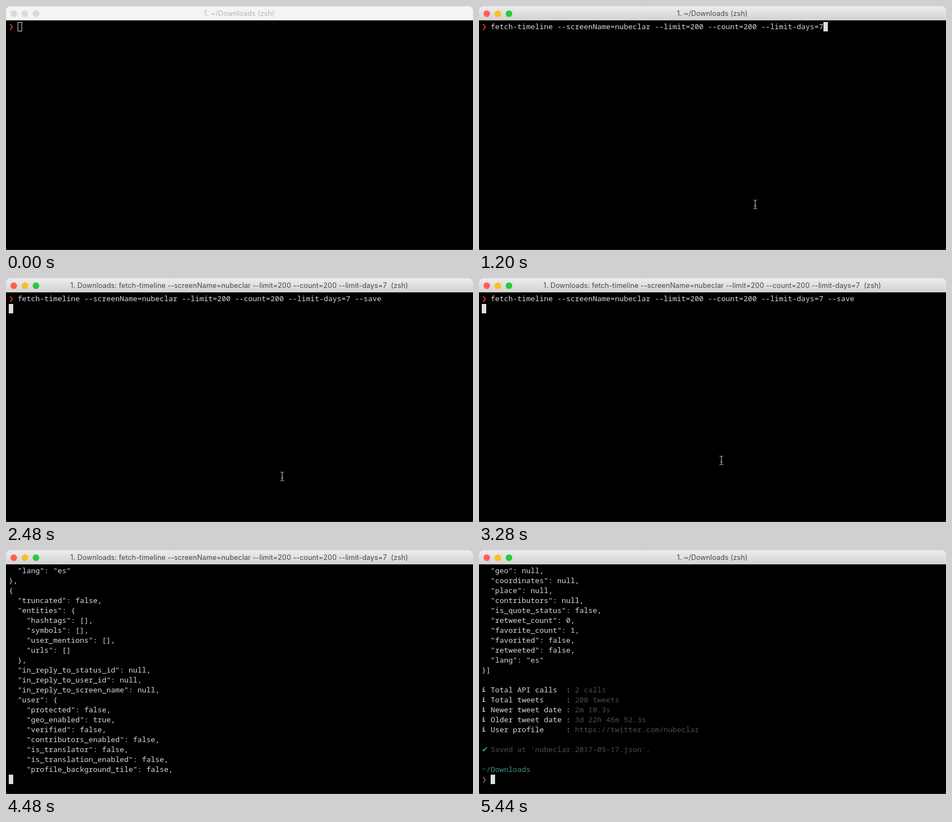
Write an HTML page that moves like this. It is 842 px wide and 442 px high and loops after 8000 ms.

```html
<!DOCTYPE html>
<html lang="en">
<head>
<meta charset="utf-8">
<title>Terminal</title>
<style>
html, body { margin: 0; width: 100%; height: 100%; overflow: hidden; background: #000; }
#stage {
  position: relative; width: 842px; height: 442px; overflow: hidden;
  background: linear-gradient(#dcdcd8 50%, #3a3a36 50%);
}
#window { position: absolute; inset: 1px 0 0; border-radius: 5px; overflow: hidden; background: #000; }
#bar { height: 25px; background: linear-gradient(#ededed, #d2d2d2); }
#title {
  position: absolute; top: 5px; left: 0; width: 841px; text-align: center; white-space: pre;
  font: 12.6px/18px Inter, sans-serif; letter-spacing: .12px; color: #48484a;
}
#bar i { position: absolute; top: 7px; width: 12px; height: 12px; border-radius: 50%; }
#bar i:nth-of-type(1) { left: 8px; background: #fb605a; }
#bar i:nth-of-type(2) { left: 28px; background: #fdba2c; }
#bar i:nth-of-type(3) { left: 48px; background: #2cc83e; }
.idle #bar { background: #f4f4f2; }
.idle #title { color: #b4b4b4; }
.idle #bar i { background: #d9d9d7; }
#cursor { position: absolute; width: 8px; height: 17px; box-sizing: border-box; background: #dededc; }
.idle #cursor { background: none; border: 1px solid #dededc; }
.hint #cursor { background: #fff; }
pre {
  position: absolute; left: 5px; top: 28px; margin: 0; color: #d6dad6;
  font: 13.3333px/18px "Noto Sans Mono", monospace; font-variant-ligatures: none;
}
pre b {
  display: inline-block; width: 8px; height: 18px; vertical-align: top;
  font: bold 10.5px/19px "DejaVu Sans", sans-serif; color: #dc3a22;
}
pre .info { font: bold 11px/19px "DejaVu Sans Mono", monospace; color: inherit; }
pre .done { color: #35ac42; font-size: 14px; }
pre .past { color: #755c74; }
pre s { text-decoration: none; color: #4a4c4a; }
pre u { text-decoration: none; color: #43908c; }
#edge { position: absolute; top: 441px; width: 100%; height: 1px; background: #262624; }
#mouse { position: absolute; left: 0; top: 0; overflow: visible; fill: none; stroke: #bcbcb8; stroke-width: 1.2; }
</style>
</head>
<body>
<div id="stage">
  <div id="window"><div id="bar"><i></i><i></i><i></i></div></div>
  <div id="title"></div>
  <div id="cursor"></div>
  <pre id="text"></pre>
  <div id="edge"></div>
  <svg id="mouse" width="1" height="1"><path d="M-3.5-7.5Q-1-7.5 0-6Q1-7.5 3.5-7.5M0-6V7M-3.5 8.5Q-1 8.5 0 7Q1 8.5 3.5 8.5M-2 3H2"/></svg>
</div>
<script>
const $ = id => document.getElementById(id);
const LOOP = 8000, STEP = 80, ROWS = 22;
const user = 'nubeclar';
const command = `fetch-timeline --screenName=${user} --limit=200 --count=200 --limit-days=7`;
const flag = ' --save';
const prompt = '<b>❯</b> ';

const tweet = `{
  "truncated": false,
  "entities": {
    "hashtags": [],
    "symbols": [],
    "user_mentions": [],
    "urls": []
  },
  "in_reply_to_status_id": null,
  "in_reply_to_user_id": null,
  "in_reply_to_screen_name": null,
  "user": {
    "protected": false,
    "geo_enabled": true,
    "verified": false,
    "contributors_enabled": false,
    "is_translator": false,
    "is_translation_enabled": false,
    "profile_background_tile": false,
    "profile_link_color": "000000",
    "profile_text_color": "000000",
    "profile_use_background_image": false,
    "has_extended_profile": true,
    "default_profile": false,
    "default_profile_image": false,
    "following": false,
    "follow_request_sent": false,
    "notifications": false,
    "translator_type": "none"
  },
  "geo": null,
  "coordinates": null,
  "place": null,
  "contributors": null,
  "is_quote_status": false,
  "retweet_count": 0,
  "favorite_count": 1,
  "favorited": false,
  "retweeted": false,
  "lang": "es"
}`.split('\n');
const json = [...tweet.slice(0, -1), '},', ...tweet.slice(0, -1), '}]'];

const stat = (label, value) => `<b class="info">i</b> ${label.padEnd(17)}: <s>${value}</s>`;
const stats = ['',
  stat('Total API calls', '2 calls'),
  stat('Total tweets', '200 tweets'),
  stat('Newer tweet date', '2m 10.3s'),
  stat('Older tweet date', '3d 22h 46m 52.3s'),
  stat('User profile', 'https://twitter.com/' + user)];
const saved = ['', `<b class="done">✔</b> <s>Saved at '${user}.2017-05-17.json'.</s>`];
const ending = ['', '<u>~/Downloads</u>', '<b class="past">❯</b> '];

// Times at which each character of the flag is typed
const keys = [1520, 1760, 1920, 2000, 2080, 2160, 2240];

// Screen contents: lines, cursor cell
function screen(t) {
  if (t < 1200) return { lines: [prompt], col: 2, row: 0 };
  if (t < 4320) {
    const n = keys.filter(k => t >= k).length;
    const rest = n ? `<s>${flag.slice(n)}</s>` : '';
    const lines = [prompt + command + flag.slice(0, n) + rest];
    if (t < 2400) return { lines, col: 2 + command.length + n, row: 0, hint: n > 0 && n < 7 };
    return { lines, col: 0, row: t < 3840 ? 1 : 2 };
  }
  const shown = t < 4400 ? 24 : t < 4480 ? 41 : t < 5040 ? 60 : json.length;
  const lines = json.slice(0, shown);
  if (t >= 5280) lines.push(...stats);
  if (t >= 5360) lines.push(...saved);
  const over = t >= 5440;
  lines.push(...(over ? ending : ['']));
  return { lines: lines.slice(-ROWS), col: over ? 2 : 0, row: ROWS - 1 };
}

// Pointer path: time, x, y
const path = [[160, 640, 300], [240, 498, 359], [2880, 498, 359], [3280, 437, 330], [3680, 470, 318], [4080, 860, 300]];
function pointer(t) {
  const i = path.findIndex(p => p[0] > t);
  if (i < 1) return null;
  const [a, b] = [path[i - 1], path[i]];
  const k = (t - a[0]) / (b[0] - a[0]), e = k * k * (3 - 2 * k);
  return [1, 2].map(j => Math.round(a[j] + (b[j] - a[j]) * e));
}

function draw(t) {
  const { lines, col, row, hint } = screen(t);
  const running = t >= 2400 && t < 5440;
  $('stage').className = t < 480 ? 'idle' : hint ? 'hint' : '';
  $('title').textContent = running ? `1. Downloads: ${command}  (zsh)` : '1. ~/Downloads (zsh)';
  $('text').innerHTML = lines.join('\n');
  $('cursor').style.left = 5 + 8 * col + 'px';
  $('cursor').style.top = 29 + 18 * row + 'px';
  const p = pointer(t);
  $('mouse').style.display = p ? '' : 'none';
  if (p) $('mouse').style.transform = `translate(${p[0]}px, ${p[1]}px)`;
}

let last = -1;
const start = performance.now();
function tick() {
  const t = Math.floor((performance.now() - start) % LOOP / STEP) * STEP;
  if (t !== last) draw(last = t);
  requestAnimationFrame(tick);
}
tick();
</script>
</body>
</html>
```
